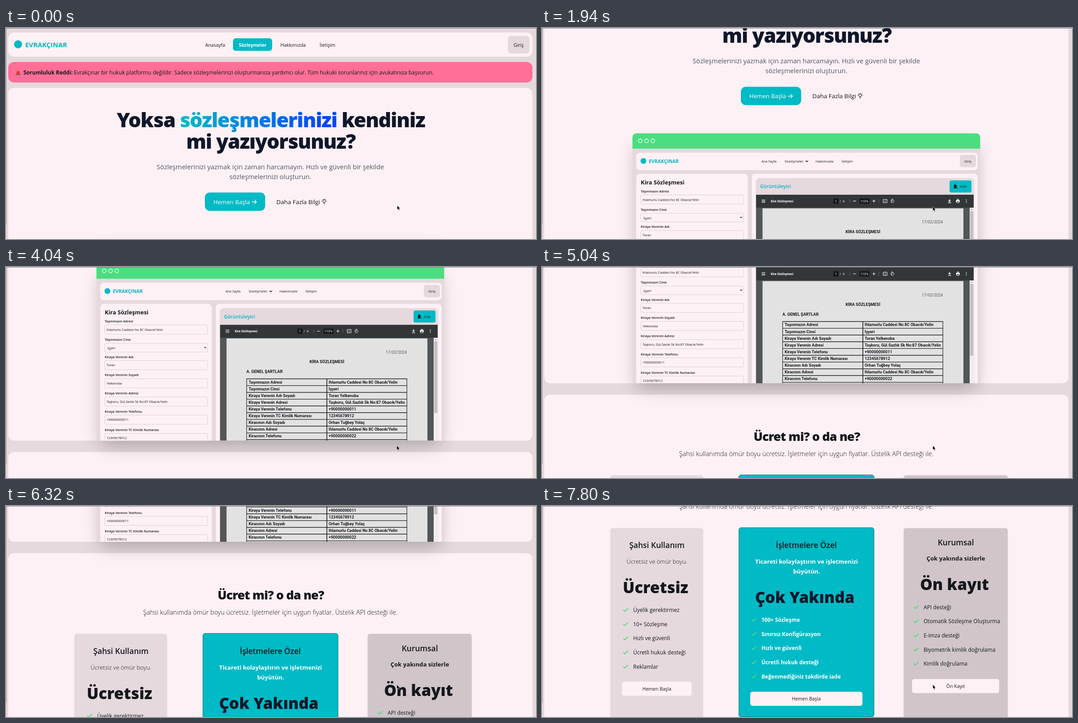
Write an HTML page that moves like this. It is 1186x472 px and loops after 8 s.

```html
<!DOCTYPE html>
<html lang="tr">
<head>
<meta charset="utf-8">
<title>Evrakçınar</title>
<style>
  html, body { margin: 0; width: 100%; height: 100%; overflow: hidden; background: #e5d9dd; }
  svg { display: block; }
  text { font-family: "Open Sans", "Noto Sans", sans-serif; fill: #14171c; }
  .mid { text-anchor: middle; }
  .light { font-weight: 300; }
  .semi { font-weight: 600; }
  .bold { font-weight: 700; }
  .black { font-weight: 800; }
  .tight { letter-spacing: -.032em; }
  .pdf { font-family: Roboto, "Liberation Sans", sans-serif; }
  .white { fill: #fff; }
  .teal { fill: #00b4c0; }
  .gray { fill: #4b5563; }
  .navy { fill: #10172a; }
</style>
</head>
<body>
<svg id="stage" width="1186" height="472" viewBox="0 0 1186 472"></svg>
<script>
const BG = '#e5d9dd', CARD = '#fef1f5', TEAL = '#00bac5', GREEN = '#4ade80';
const NOTCH = 78.85, LOOP = 8000;

// [time in ms, wheel notches scrolled]
const steps = [
  [500, .5], [620, .93], [740, 1], [990, 1.6], [1140, 2],
  [1670, 2.4], [1790, 2.93], [1940, 3], [2340, 3.6], [2490, 4],
  [2920, 4.54], [3040, 5], [3470, 5.4], [3610, 5.97], [3760, 6],
  [4040, 6.09], [4160, 6.9], [4330, 7], [5040, 7.717], [5160, 8],
  [5580, 8.3], [5700, 8.95], [5830, 9], [6200, 9.6], [6320, 10],
  [6750, 10.6], [6870, 11], [7270, 11.6], [7390, 12], [7680, 12.6], [7800, 13]
];

const box = (x, y, x2, y2, r, fill, more = '') =>
  `<rect x="${x}" y="${y}" width="${x2 - x}" height="${y2 - y}" rx="${r}" fill="${fill}" ${more}/>`;
const text = (x, y, size, str, cls = '') =>
  `<text x="${x}" y="${y}" font-size="${size}" class="${cls}">${str}</text>`;
const line = (d, color, width = 1) =>
  `<path d="${d}" fill="none" stroke="${color}" stroke-width="${width}"/>`;
const dot = (x, y, r, fill) => `<circle cx="${x}" cy="${y}" r="${r}" fill="${fill}"/>`;

function header() {
  return box(5, 10, 1178, 64, 13, CARD) + dot(27, 36.5, 9, TEAL) +
    text(43, 43, 14.8, 'EVRAKÇINAR', 'bold teal') +
    text(468, 41.5, 10.5, 'Anasayfa', 'mid') +
    box(508, 23, 595.5, 51, 6, TEAL) + text(552, 41.5, 10.4, 'Sözleşmeler', 'mid bold white') +
    text(642.5, 41.5, 10.5, 'Hakkımızda', 'mid') + text(719.5, 41.5, 10.5, 'İletişim', 'mid') +
    box(1123, 18, 1171.5, 57, 7, BG) + text(1147, 42, 10.7, 'Giriş', 'mid');
}

function notice() {
  return box(5, 76, 1178, 122, 13, '#ff6f97') +
    line('M22 97l2 1M32 97l-2 1M27 93v2', '#ffb02e') +
    box(23.5, 96, 30.5, 104, 3, '#e8362f') + box(22, 102.5, 32, 105.5, 1, '#7d5b66') +
    text(39, 104, 12, 'Sorumluluk Reddi:', 'bold') +
    text(152, 104, 12, 'Evrakçınar bir hukuk platformu değildir. Sadece sözleşmelerinizi oluşturmanıza yardımcı olur. Tüm hukuki sorunlarınız için avukatınıza başvurun.');
}

function hero() {
  const bulb = line('M710.7 391v-1.2a3 3 0 1 1 2.6 0v1.2zM710.7 393.5h2.6M712 382.3v1.2M706 387h1.4M716.6 387h1.4M707.6 383l1 .9M716.4 383l-1 .9', '#14171c', 1.1);
  return box(5, 134, 1178, 868.5, 13, CARD) +
    text(592.5, 222, 45, 'Yoksa <tspan fill="url(#ink)">sözleşmelerinizi</tspan> kendiniz', 'mid black tight navy') +
    text(592.5, 270, 45, 'mi yazıyorsunuz?', 'mid black tight navy') +
    text(591.5, 316, 14.7, 'Sözleşmelerinizi yazmak için zaman harcamayın. Hızlı ve güvenli bir şekilde', 'mid gray') +
    text(591.5, 338, 14.7, 'sözleşmelerinizi oluşturun.', 'mid gray') +
    box(445, 368, 580, 409, 11, TEAL) + text(464, 394, 13.3, 'Hemen Başla', 'white') +
    line('M550 389h10M556 384.6l4.3 4.4l-4.3 4.4', '#fff', 1.4) +
    text(605, 394, 13.45, 'Daha Fazla Bilgi') + bulb;
}

const home = 'Ihlamurlu Caddesi No 8C Obacık/Yelin';
const office = 'Taşkoru, Gül.Sazlık Sk No:87 Obacık/Yelin';
const phone = '+90000000011', idNo = '12345678912';

function form() {
  const fields = [
    [604.5, 'Taşınmazın Adresi', home], [645.5, 'Taşınmazın Cinsi', 'İşyeri'],
    [684, 'Kiraya Verenin Adı', 'Toran'], [724.5, 'Kiraya Verenin Soyadı', 'Yelkenoba'],
    [765.5, 'Kiraya Verenin Adresi', office], [806, 'Kiraya Verenin Telefonu', phone],
    [847, 'Kiraya Verenin TC Kimlik Numarası', idNo]
  ];
  return box(211, 562.5, 460.5, 890, 8, CARD) + text(221, 586.5, 12.7, 'Kira Sözleşmesi', 'bold') +
    fields.map(([y, label, value], i) =>
      text(221, y, 7.3, label, 'semi') +
      box(221, y + 5.5, 451, y + (i == 1 ? 25 : 26), 3, CARD, 'stroke="#d3cdd4" stroke-width=".9"') +
      text(i == 1 ? 227 : 225, y + 18.7, 7.2, value)).join('') +
    line('M443.5 659l2.3 2.3l2.3-2.3', '#222', 1.2);
}

function viewer() {
  const rows = [
    ['Taşınmazın Adresi', home], ['Taşınmazın Cinsi', 'İşyeri'],
    ['Kiraya Verenin Adı Soyadı', 'Toran Yelkenoba'], ['Kiraya Verenin Adresi', office],
    ['Kiraya Verenin Telefonu', phone], ['Kiraya Verenin TC Kimlik Numarası', idNo],
    ['Kiracının Adı Soyadı', 'Orhan Tuğbey Yolaç'], ['Kiracının Adresi', home],
    ['Kiracının Telefonu', '+90000000022']
  ];
  const bar = box(479, 609.5, 966, 638.5, 0, '#323639') +
    line('M491.5 621h8M491.5 623.7h8M491.5 626.4h8', '#fff', 1.1) +
    text(512, 626.2, 7, 'Kira Sözleşmesi', 'pdf bold white') +
    box(652, 618, 663.5, 629.5, 0, '#151719') + text(657.7, 626.3, 7.2, '1', 'pdf mid white') +
    text(666, 626.3, 7.2, '/', 'pdf white') + text(673, 626.3, 7.2, '4', 'pdf white') +
    line('M689 619.5v8M753.5 619.5v8', '#777b7e', .8) +
    box(710.5, 618, 732.5, 629.5, 0, '#151719') + text(721.5, 626.3, 7.2, '110%', 'pdf mid white') +
    line('M696 623.7h6.5M739.5 623.7h6.5M742.7 620.5v6.5', '#fff', 1.1) +
    line('M763.5 620h8.6v7.4h-8.6zM767.8 621.5v1.6M767.8 624.3v1.6M765.5 623.7h1M769 623.7h1', '#fff') +
    line('M783 620.3a3.6 3.6 0 1 1-2 5.5M784.5 618l-2 2.3l2 2.2M780 623.5l2-2l2 2l-2 2z', '#fff', .9) +
    line('M912 619.5v5M909.6 622.3l2.4 2.5l2.4-2.5M908.7 627.3h6.6', '#fff', 1.3) +
    line('M928 620h5.2', '#fff', 1.6) + box(926.3, 621.5, 934.8, 626, 1, '#fff') +
    box(928.3, 624, 932.8, 627.6, 0, '#323639', 'stroke="#fff" stroke-width=".9"') +
    [620.7, 623.7, 626.7].map(y => dot(949.5, y, .9, '#fff')).join('');
  const table = rows.map(([key, value], i) => {
    const y = 730.5 + 15.1 * i;
    return line(`M538 ${y}H897.5`, '#222', 1.4) +
      text(543, y + 10.4, 9, key, 'pdf bold') + text(722, y + 10.4, 9, value, 'pdf bold');
  }).join('') + line('M538 866.4H897.5', '#222', 1.4) +
    line('M538.5 730V880M897 730V880', '#222', 1.2) + line('M718 730V880', '#222', 1.7);
  return box(469.5, 562.5, 975, 890, 8, CARD) +
    box(479, 572.5, 966, 890, 7, BG, 'filter="url(#soft)"') +
    text(488, 595, 10.7, 'Görüntüleyici', 'semi teal') +
    box(912, 577.5, 961, 604.5, 4, TEAL) +
    '<path d="M922 587h4l2 2v3h-2v3.500h-4z" fill="#14171c"/>' + line('M926 594h4', '#14171c', 1.5) +
    text(935, 594, 7.3, 'İndir') +
    box(479, 638, 957, 890, 0, '#525659') + box(493.5, 640, 943, 890, 0, '#e2e2e2') +
    box(957, 638.5, 966, 890, 0, '#efedef') + box(958, 646, 965.3, 807, 0, '#c4c0c3') +
    '<path d="M959.500 643.500l2-2.500l2 2.500z" fill="#888"/>' + bar +
    text(897, 674, 9, '17/02/2024', 'pdf light" text-anchor="end') +
    text(718, 695.7, 9.2, 'KİRA SÖZLEŞMESİ', 'pdf mid bold') +
    text(538, 717.5, 9.1, 'A. GENEL ŞARTLAR', 'pdf bold') + table;
}

function mock() {
  const rings = [220, 234, 248].map(x =>
    `<circle cx="${x}" cy="489" r="4.2" fill="none" stroke="#fff" stroke-width="1.3"/>`).join('');
  return box(211.5, 501.5, 971, 879, 9, '#000', 'opacity=".25" filter="url(#blur)"') +
    `<g clip-path="url(#window)">` +
    box(202.5, 472, 980.5, 900, 9, BG) + box(202.5, 472, 980.5, 490, 9, GREEN) +
    box(202.5, 482, 980.5, 506.5, 0, GREEN) + rings +
    box(211, 515.5, 975, 554.5, 8, CARD) + dot(227, 534, 6.5, TEAL) +
    text(239, 538.7, 10.6, 'EVRAKÇINAR', 'bold teal') +
    text(508, 537.5, 7.4, 'Ana Sayfa', 'mid') + text(564, 537.5, 7.5, 'Sözleşmeler', 'mid') +
    line('M590 533.3l2.700 2.700l2.700-2.700', '#14171c', 1.5) +
    text(632, 537.5, 7.4, 'Hakkımızda', 'mid') + text(683, 537.5, 7.4, 'İletişim', 'mid') +
    box(935, 520.5, 971, 548, 5, BG) + text(953, 537.5, 7.5, 'Giriş', 'mid') +
    form() + viewer() + '</g>';
}

// y is the centre of the first item
const list = (x, y, items, cls = '') => items.map((item, i) => {
  const c = y + 31.6 * i;
  return line(`M${x - 22} ${c - .5}l3.500 3.500l7-7`, GREEN, 1.8) + text(x, c + 4.3, 12, item, cls);
}).join('');

const button = (x, y, x2, label) =>
  box(x, y, x2, y + 31.5, 5, CARD) + text((x + x2) / 2, y + 19.8, 10.5, label, 'mid');

function pricing() {
  const soft = 'filter="url(#soft)"';
  return text(592.5, 997, 27, 'Ücret mi? o da ne?', 'mid black tight') +
    text(591.5, 1031.5, 14.4, 'Şahsi kullanımda ömür boyu ücretsiz. İşletmeler için uygun fiyatlar. Üstelik API desteği ile.', 'mid light') +

    box(153.5, 1074.5, 360, 1510, 5, BG, soft) +
    text(257, 1119.5, 17.5, 'Şahsi Kullanım', 'mid semi') +
    text(257, 1154, 13.2, 'Ücretsiz ve ömür boyu.', 'mid light') +
    text(254, 1220, 35, 'Ücretsiz', 'mid black') +
    list(204, 1258, ['Üyelik gerektirmez', '10+ Sözleşme', 'Hızlı ve güvenli', 'Ücretli hukuk desteği', 'Reklamlar']) +
    button(179, 1418, 335, 'Hemen Başla') +

    box(440.5, 1073.5, 743, 1497, 5, TEAL, 'stroke="#1c6b74"') +
    text(591.5, 1119.5, 17.5, 'İşletmelere Özel', 'mid semi') +
    text(592, 1154, 13.2, 'Ticareti kolaylaştırın ve işletmenizi', 'mid bold white') +
    text(592, 1176, 13.2, 'büyütün.', 'mid bold white') +
    text(588, 1242, 35, 'Çok Yakında', 'mid black navy') +
    list(491, 1280, ['100+ Sözleşme', 'Sınırsız Konfigürasyon', 'Hızlı ve güvenli', 'Ücretli hukuk desteği', 'Beğenmediğiniz takdirde iade'], 'bold white') +
    button(466, 1440.5, 717, 'Hemen Başla') +

    box(809.5, 1074.5, 1042, 1510, 5, '#d0c5c9', soft) +
    text(926, 1113, 17.5, 'Kurumsal', 'mid semi') +
    text(926, 1147, 13.2, 'Çok yakında sizlerle', 'mid bold') +
    text(923, 1213.5, 35, 'Ön kayıt', 'mid black') +
    list(854, 1251.5, ['API desteği', 'Otomatik Sözleşme Oluşturma', 'E-imza desteği', 'Biyometrik kimlik doğrulama', 'Kimlik doğrulama']) +
    button(828, 1412, 1023, 'Ön Kayıt');
}

const stage = document.getElementById('stage');
stage.innerHTML = `<defs>
  <linearGradient id="ink" gradientUnits="userSpaceOnUse" x1="388" x2="740" y1="0" y2="0">
    <stop stop-color="#00bcc4"/><stop offset=".9" stop-color="#0048ff"/></linearGradient>
  <filter id="blur" x="-20%" y="-30%" width="140%" height="160%"><feGaussianBlur stdDeviation="20"/></filter>
  <filter id="soft"><feDropShadow dx="0" dy="1" stdDeviation="1.5" flood-opacity=".14"/></filter>
  <clipPath id="window"><rect x="202" y="472" width="779" height="396.5"/></clipPath>
</defs>
${box(0, 0, 1186, 472, 0, BG)}
<g id="page">${header()}${notice()}${hero()}${box(5, 894, 1178, 1700, 13, CARD)}${mock()}${pricing()}</g>
${box(0, 0, 1186, 1, 0, '#857d82')}${box(0, 0, 1, 440, 0, '#958d92')}
<path id="cursor" d="M0 0v9.500l2.100-1.900l1.600 3.500l1.600-.7l-1.600-3.400h2.900z" stroke="#fff" stroke-width=".5"/>`;

const page = document.getElementById('page'), cursor = document.getElementById('cursor');

function draw() {
  const t = performance.now() % LOOP;
  let notches = 0;
  for (const [at, n] of steps) if (t >= at) notches = n;
  page.setAttribute('transform', `translate(0 ${-notches * NOTCH})`);
  cursor.setAttribute('transform', t < 500 ? 'translate(875.5 397)' : 'translate(874.5 399.500)');
  requestAnimationFrame(draw);
}
draw();
</script>
</body>
</html>
```
